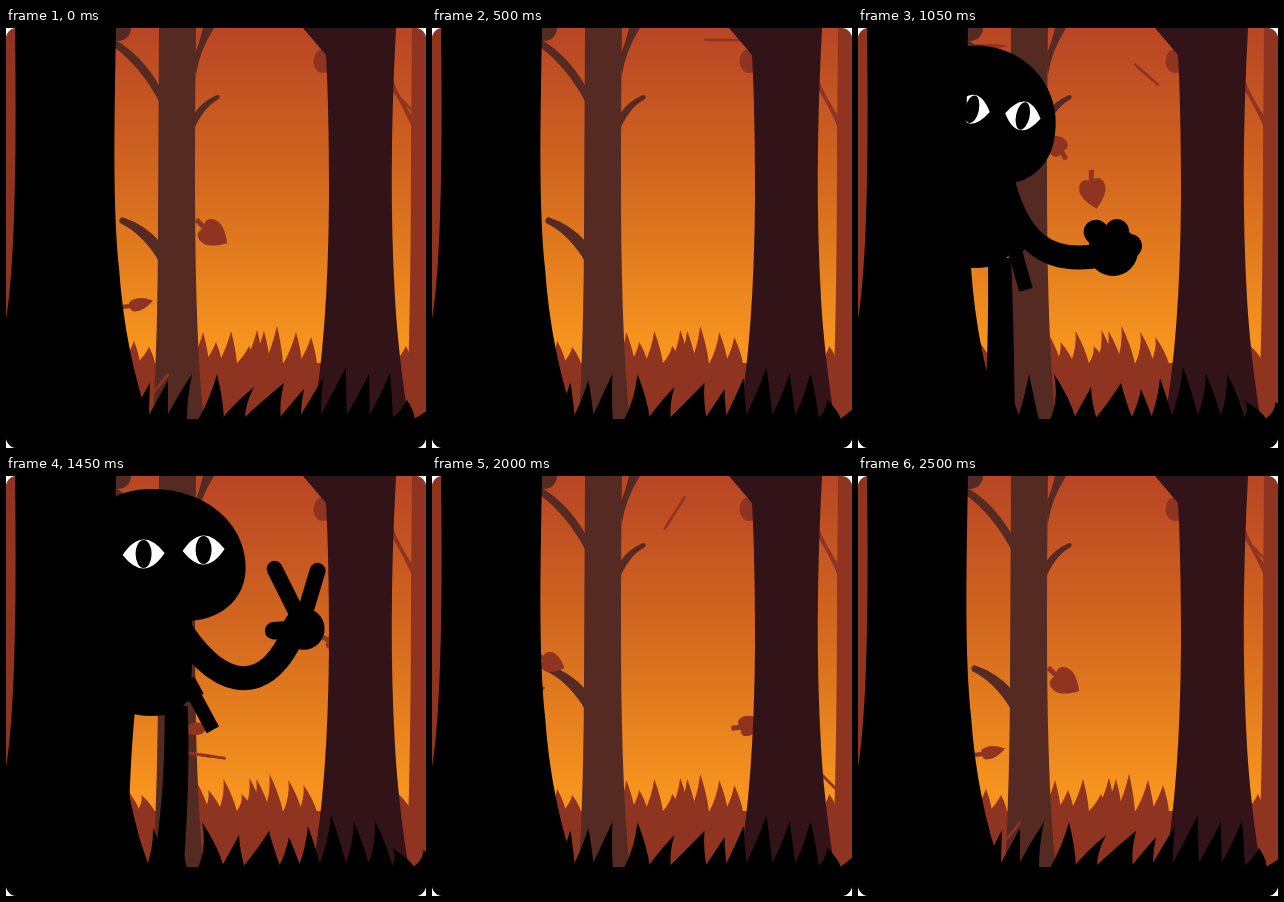
These frames come from a looping animation (420x420 px, 2.55 s). An HTML page with a canvas:

```html
<!DOCTYPE html>
<html lang="en">
<head>
<meta charset="utf-8">
<title>Autumn forest</title>
<style>
  html, body { margin: 0; width: 100%; height: 100%; overflow: hidden; background: #fff; }
  canvas { display: block; width: 100vw; height: 100vh; }
</style>
</head>
<body>
<canvas id="stage" width="420" height="420"></canvas>
<script>
const ctx = document.getElementById('stage').getContext('2d');
const LOOP = 2550, STEP = 50, CYCLE = 2500;
const FAR = '#8f3420', MID = '#552a22', NEAR = '#321318', BLACK = '#000';

const lerp = (a, b, u) => a + (b - a) * u;
const fill = (color, d) => { ctx.fillStyle = color; ctx.fill(new Path2D(d)); };
const disc = (x, y, rx, ry = rx) => {
  ctx.beginPath();
  ctx.ellipse(x, y, rx, ry, 0, 0, Math.PI * 2);
  ctx.fill();
};
const line = (width, x1, y1, x2, y2) => {
  ctx.lineWidth = width;
  ctx.beginPath();
  ctx.moveTo(x1, y1);
  ctx.lineTo(x2, y2);
  ctx.stroke();
};

const sky = ctx.createLinearGradient(0, 0, 0, 315);
sky.addColorStop(0, '#b84524');
sky.addColorStop(0.5, '#d4691f');
sky.addColorStop(1, '#f7941e');

// Left base, resting tip x, tip y; a blade ends where the next begins
const frontGrass = [
  [124, 136, 354], [140, 154, 352], [159, 178, 346], [192, 203, 346],
  [215, 240, 359], [236, 270, 355], [272, 290, 361], [292, 309, 350],
  [312, 332, 339], [338, 355, 346], [361, 376, 345], [384, 393, 372], [406, 424, 374]
];
// Tip x, tip y
const backGrass = [
  [124, 313], [139, 319], [193, 304], [206, 314], [221, 303], [239, 318],
  [247, 302], [254, 303], [267, 298], [286, 304], [301, 309], [396, 318]
];

function ground(color, base) {
  ctx.fillStyle = color;
  ctx.fillRect(0, base - 1, 420, 421 - base);
}

function blade(l, r, tip, top, base, sway) {
  const w = r - l, mid = lerp(top, base, 0.55);
  ctx.beginPath();
  ctx.moveTo(l, base);
  ctx.quadraticCurveTo(l + w * 0.4 + sway * 0.2, mid, tip + sway, top);
  ctx.quadraticCurveTo(r - w * 0.12 + sway * 0.3, mid, r, base);
  ctx.fill();
}

function drawBackGrass(sway) {
  ground(FAR, 336);
  for (const [tip, top] of backGrass) blade(tip - 9, tip + 10, tip, top, 336, sway);
}

function drawFrontGrass(sway) {
  ground(BLACK, 392);
  frontGrass.forEach(([l, tip, top], i) => {
    const next = frontGrass[i + 1];
    const r = next ? Math.min(next[0] + 3, l + 56) : 440;
    blade(l, i === 2 ? 181 : r, tip, top, 392, sway);
  });
}

// Each leaf: size, then keys of time, x, y, angle, flatness
const leaves = [
  [1, [1800, 270, -4, 90, 0.9], [2000, 244, 35, -58, 0.04], [2500, 207, 206, 33, 1]],
  [0.85, [1050, 136, 18, 0, 0.2], [1800, 262, 196, 15, 0.8], [2000, 318, 249, -18, 0.9]],
  [1, [500, 294, 12, 0, 0.05], [1050, 235, 164, 78, 1], [1450, 203, 280, 8, 0.12]],
  [0.78, [1050, 198, 117, 225, 1], [1450, 188, 253, 175, 0.6]],
  [0.83, [1050, 290, 48, 41, 0.1], [1450, 331, 168, 20, 0.7],
    [1800, 403, 253, 90, 0.7], [2000, 398, 307, 45, 0.08]],
  [0.8, [2000, 120, 187, 22, 0.95], [2500, 134, 276, -15, 0.6]],
  [0.6, [2500, 156, 354, -52, 0.08]],
  [0.65, [2500, 398, 74, 45, 0.12]]
];

function sample(keys, time, ease = () => u => u) {
  const i = keys.findIndex((k, n) => n < keys.length - 1 && time >= k[0] && time < keys[n + 1][0]);
  if (i < 0) return null;
  const a = keys[i], b = keys[i + 1];
  const u = ease(i)((time - a[0]) / (b[0] - a[0]));
  return a.map((v, n) => lerp(v, b[n], u)).slice(1);
}

// Outside its keys a leaf drifts at a steady rate
function leafState(keys, time) {
  const inside = sample(keys, time);
  if (inside) return inside;
  const [t, x, y, angle, flat] = time < keys[0][0] ? keys[0] : keys[keys.length - 1];
  return [x + (time - t) * 0.1, y + (time - t) * 0.27, angle, flat];
}

function leaf(size, [x, y, angle, flat]) {
  ctx.save();
  ctx.translate(x, y);
  ctx.rotate(angle * Math.PI / 180);
  ctx.fillStyle = ctx.strokeStyle = FAR;
  ctx.lineCap = 'butt';
  line(Math.min(5, 2 + 4 * flat), -22 * size, -3 * flat, -8 * size, 0);
  if (flat < 0.2) line(2.6, -17 * size, 0, 17 * size, 0);
  ctx.scale(size, size * flat);
  ctx.beginPath();
  ctx.moveTo(17, 0);
  for (const s of [1, -1]) {
    ctx.moveTo(17, 0);
    ctx.bezierCurveTo(8, 10 * s, 1, 14 * s, -5, 13 * s);
    ctx.bezierCurveTo(-14, 12 * s, -15, 4 * s, -10, 0);
  }
  ctx.fill();
  ctx.restore();
}

// Pose: body shift, head x, y, tilt, scale, arm c1, arm c2, hand,
// thumb, first fingertip, second fingertip, finger width, palm radius
const peek = [-28, 124.5, 85.5, 12, 0.85, 160, 215, 190, 238, 255, 223, -17, -19, 4, -20, 17, -5, 24, 25];
const wave = [0, 150, 80, 0, 1, 205, 205, 255, 230, 297, 154, -30, 2, -29, -60, 14, -58, 16, 21];
const shift = (pose, dx) => pose.map((v, n) => [0, 1, 5, 7, 9].includes(n) ? v + dx : v);
const lean = shift(wave, 2).map((v, n) => n === 10 ? v - 4 : v);
const poses = [
  [850, ...shift(peek, -190)], [1050, ...peek], [1300, ...wave],
  [1800, ...lean], [1970, ...shift(lean, -225)]
];
const poseEase = i => [u => u, u => 1 - (1 - u) ** 2, u => u, u => u * u][i];

function eye(x, y) {
  ctx.save();
  ctx.translate(x, y);
  fill('#fff', 'M-21 1Q-1 -29 21 -1Q1 29 -21 1Z');
  ctx.fillStyle = BLACK;
  disc(0, 0, 8, 14);
  ctx.restore();
}

function character(pose) {
  const [bx, hx, hy, tilt, scale, c1x, c1y, c2x, c2y, px, py,
    tx, ty, f1x, f1y, f2x, f2y, fw, pr] = pose;
  const foot = bx * 0.72;
  ctx.fillStyle = ctx.strokeStyle = BLACK;

  fill(BLACK, `M${60 + bx} 110H${184 + bx}Q${188 + bx} 180 ${183 + bx} 222` +
    `Q${172 + bx} 240 ${145 + bx} 240Q${130 + bx} 240 ${122 + bx} 236H${60 + bx}Z`);
  fill(BLACK, `M${158 + bx} 230H${181 + bx}Q${184 + bx} 300 ${177 + foot} 395` +
    `H${146 + foot}Q${159 + bx} 320 ${158 + bx} 230Z`);
  fill(BLACK, `M${90 + bx} 230H${129 + bx}Q${123 + bx} 280 ${121 + bx} 395H${90 + bx}Z`);

  ctx.lineCap = 'round';
  ctx.lineWidth = 24;
  ctx.beginPath();
  ctx.moveTo(172 + bx, 150);
  ctx.bezierCurveTo(c1x, c1y, c2x, c2y, px - 10, py + 4);
  ctx.stroke();

  ctx.lineCap = 'butt';
  const ex = 206 + bx * 1.36, ey = 254 - bx * 0.28;
  line(14, 180 + bx, 205, ex, ey);
  line(18, 180 + bx, 205, lerp(180 + bx, ex, 0.35), lerp(205, ey, 0.35));
  ctx.lineCap = 'round';

  disc(px, py, pr);
  line(fw * 0.9 + 3, px, py, px + tx, py + ty);
  line(fw, px - 4, py - 10, px + f1x, py + f1y);
  line(fw, px - 1, py - 8, px + f2x, py + f2y);

  ctx.save();
  ctx.translate(hx, hy);
  ctx.rotate(tilt * Math.PI / 180);
  ctx.scale(scale, 1);
  fill(BLACK, 'M-75 0C-75 -50 -40 -67 -5 -67C50 -67 89 -32 89 12C89 46 60 65 30 65H-75Z');
  eye(-13, -2);
  eye(47, -6);
  ctx.restore();
}

function midTree() {
  fill(MID, 'M153 0H190Q188 160 190 250Q192 340 198 395H147Q152 300 152 200Z');
  fill(MID, 'M108 11Q136 27 154 59V75Q135 39 108 19Z');
  fill(MID, 'M188 28Q194 14 197 0H208Q193 24 190 47Z');
  fill(MID, 'M188 86Q195 74 211 67Q215 67 213 71Q199 78 189 99Z');
  fill(MID, 'M116 189Q140 197 154 214V235Q137 206 114 195Q112 191 116 189Z');
  disc(112, 0, 13);
}

function draw(time) {
  const t = time % CYCLE;
  const sway = Math.cos(t / CYCLE * Math.PI * 2);
  ctx.clearRect(0, 0, 420, 420);
  ctx.save();
  ctx.beginPath();
  ctx.roundRect(0, 0, 420, 420, 11);
  ctx.clip();

  ctx.fillStyle = sky;
  ctx.fillRect(0, 0, 420, 420);
  fill(FAR, 'M0 0H20V300H0Z');
  fill(FAR, 'M406 0H420V350H402Q405 250 405 120Z');
  fill(FAR, 'M385 48Q394 70 408 91V104Q396 76 385 60Z');
  disc(317, 33, 9.5, 12);
  drawBackGrass(sway * 4);
  midTree();

  for (const [size, ...keys] of leaves) {
    for (const when of [t, t + CYCLE]) {
      const state = leafState(keys, when);
      if (state[1] > -40 && state[1] < 358) leaf(size, state);
    }
  }

  fill(NEAR, 'M297 0H390Q382 150 389 270Q392 325 403 395H306Q322 310 323 170Q323 80 320 27Z');
  const pose = sample(poses, t, poseEase);
  if (pose) character(pose);
  fill(BLACK, 'M9 0H110C108 110 107 180 113 240Q119 325 144 395H0V291Q12 220 9 0Z');
  drawFrontGrass(sway * 8);
  ctx.restore();
}

const start = performance.now();
function tick() {
  const elapsed = (performance.now() - start) % LOOP;
  draw(Math.floor(elapsed / STEP) * STEP);
  requestAnimationFrame(tick);
}
tick();
</script>
</body>
</html>
```
